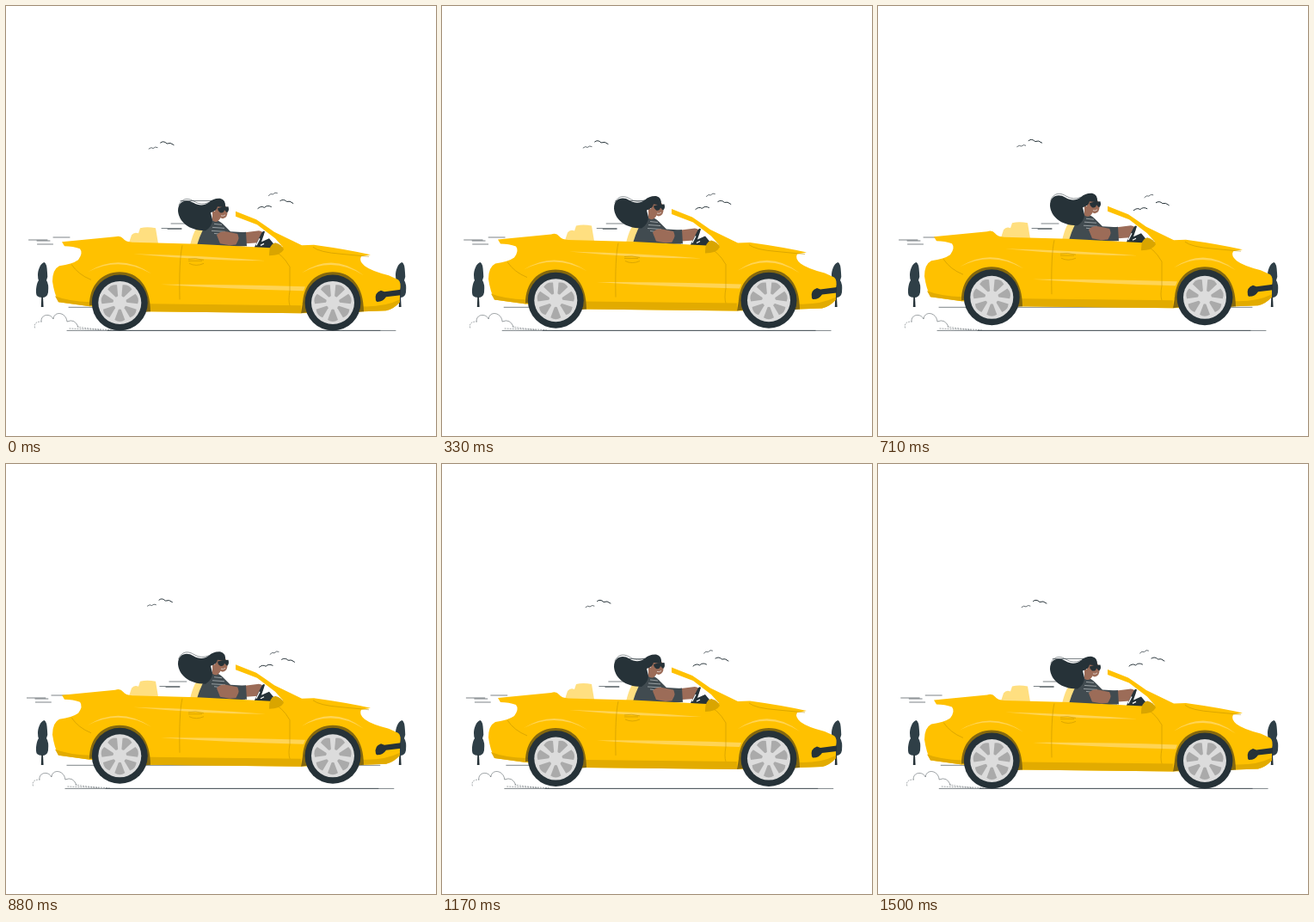
Recreate the animation shown at these times as an HTML page. Size 500 by 500 pixels, loop 1.54 s.

```html
<!DOCTYPE html>
<html lang="en">
<head>
<meta charset="utf-8">
<title>Convertible</title>
<style>
  html, body { margin: 0; width: 100%; height: 100%; overflow: hidden; background: #fff; }
  svg { display: block; width: 100%; height: 100%; }
  .line { fill: none; stroke: #263238; stroke-linecap: round; stroke-linejoin: round; }
  .seam { fill: none; stroke: #b98c00; stroke-width: .5; }
  .dark { fill: #263238; }
  .shade { fill: #e2ab00; }
  .light { fill: #ffd454; }
  .seat { fill: #ffdf80; }
  .skin { fill: #9c6c58; }
  .shirt { fill: #414b50; }
</style>
</head>
<body>
<svg viewBox="0 0 500 500">
  <defs>
    <g id="tree">
      <path fill="#2f3f47" d="M44.500 298C40 299 37 307 37 313Q37 317 38 319C35 323 34 334 36 337Q38 339 42 339Q48 339 49 333Q50 323 47 319Q49 315 48 310Q47.500 299 44.500 298Z"/>
      <path class="dark" d="M41.300 338H43L43.600 350H40.800Z"/>
    </g>
    <g id="wheel">
      <circle class="dark" r="32.500"/>
      <circle r="25" fill="#dcdcdc"/>
      <g id="vents" fill="#aaa"></g>
    </g>
    <path id="arch" fill="#86690e" d="M-35 3C-35-21-20-36 0-36C22-36 36-19 36 10L25 11L-25 3Z"/>
  </defs>

  <g class="line">
    <g id="birdsLeft">
      <path d="M180.500 159.500Q184 156.500 188 160.500Q192 158.500 196 162"/>
      <path stroke-width=".7" d="M167 166.500Q170 164 172 166Q174.500 163.500 177 165"/>
    </g>
    <g id="birdsRight">
      <path stroke-width=".7" d="M304.500 220Q307 217 309.500 218.500Q312 215.500 314.500 217"/>
      <path d="M318 226Q322 223.500 325.500 227Q329 225.500 333 229"/>
      <path d="M292 235Q296 231.500 299.500 234Q303 230.500 307.500 233"/>
    </g>
  </g>

  <use href="#tree"/>
  <use href="#tree" x="416"/>

  <g id="streaks" class="line" stroke-width=".6">
    <path d="M26.500 272H48M36 273H51M36.500 277H54.500M55 269H74M192 253H212M181 258.500H204M188 259.500H204M203 226.500H242M73 350.300H437"/>
    <path d="M71 377.400H453M118 377.400H435"/>
    <g stroke-width=".45">
      <path stroke-dasharray="1 2" d="M33.500 374Q32 367 41 367M83 373Q100 376 122 376.500M74 375L110 376.500"/>
      <path d="M41 367C40 358 52 357 55 364C56 354 70 356 71 367Q80 363 84 373"/>
    </g>
  </g>

  <g id="car">
    <path class="seat" d="M143 275L146 266Q149 262 154 264L156 258Q164 256 174 258L177 276ZM214 278Q219 258 224 256.500L232 257V278Z"/>

    <g id="driver">
      <path class="shirt" d="M222 278Q228 258 236 250Q245 246 252 253L261 262L278 263V279L240 281Z"/>
      <path d="M242 253L251 254M240 257L254 258M239 261L255 262M242 264L250 265" fill="none" stroke="#aeb4b6" stroke-width=".8"/>
      <path class="skin" d="M240 238L250 240L249 247Q245 253 240 249ZM244 231Q256 226 257.500 238Q258 246 252 247Q244 245 243 238Z"/>
      <path class="skin" d="M245 266Q249 261 256 262L271 265L270 277L260 278L249 276ZM278 263L294 261Q301 262 299 268L293 275L279 276Z"/>
      <path class="shirt" d="M269 264L279 262.500L280 279L267 278L271 270Z"/>
      <path class="dark" d="M255 234Q256 225 249 223.500Q241 223 236 228C230 232.500 224 232 218 228.500C210 223.500 200 226 200 238C201 250 212 261 232 261Q240 256 240 248L238 240Q245 238 246 233Z"/>
      <path class="line" stroke-width=".5" d="M201 231C205 222 213 223 219 227Q227 232 236 228"/>
      <path class="dark" d="M246 235L251 233.500L258.500 233Q260 238 257 240L254 237Q253 241 249 240Q246 238 246 235Z"/>
      <path d="M250 243.500Q253 244.500 255 242.500" fill="none" stroke="#fff" stroke-width=".6"/>
    </g>

    <path class="dark" d="M289 280L297 264Q299 260 301 262L297 274L306 270L311 276V282H289Z"/>
    <path d="M291 278L295 270M296 278L300 276" stroke="#fff" stroke-width="1.200"/>

    <path id="body" fill="#ffc100" d="M65 274L127 268Q133 266 136 270Q139 274 147 274.500L222 276.500L308 281L322 280L313 270L292 254L267 244.500V238.500L291 248Q300 254 312 262.500L344 278L358 277.500Q398 283 424 289L413 291Q410 296 417 302Q425 308 445 313L456 318Q460 321 458 331V344Q451 352 442 354L415 355L343 357L167 355L97 349L61 344Q56 334 54 320Q54 306 62 302Q77 300 84 295Q90 287 86 282Q78 279 68 279Z"/>
    <path class="shade" d="M57 337Q72 343 98 344V349L61 344ZM167 346L343 348V357L167 355ZM414 349Q440 350 458 341V344Q451 352 442 354L415 355Z"/>
    <use href="#arch" x="132" y="345"/>
    <use href="#arch" x="380" y="345"/>
    <path fill="#86690e" d="M345 345L350 340V356L343 357Z"/>

    <path class="light" d="M95 309Q132 286 169 311Q132 290 95 309ZM344 310Q380 285 416 313Q380 290 344 310ZM180 323.500Q260 323 348 326L346 331Q260 329 180 323.500ZM148 288Q230 290 302 296Q230 296 148 288Z"/>
    <path class="seam" d="M205 278Q201 295 202 341M307 282Q321 287 330 303V331Q328 342 330 348M76 300Q84 312 99 318M357 280Q364 286 390 288L422 291M212 294Q220 292 230 295M213 299Q221 303 230 299M212 296H228"/>
    <path fill="#d9a500" d="M306 288Q306 277 313 275Q321 277 323 283Q319 290 306 290Z"/>
    <path class="dark" d="M430 342Q428 333 436 330.500L440 332L459 329.500V336L442 338Q438 344 431 343.500Z"/>

    <use href="#wheel" x="132.300" y="344.600"/>
    <use href="#wheel" x="380" y="344.600"/>
  </g>
</svg>
<script>
const LOOP = 1540, TAU = 2 * Math.PI;
const el = id => document.getElementById(id);
const move = (id, x, y) => el(id).setAttribute('transform', `translate(${x} ${y})`);

el('vents').innerHTML = Array.from({ length: 7 }, (_, i) =>
  `<path transform="rotate(${i * 360 / 7})" d="M-1.500 8Q0 7 1.500 8L6 20Q0 24-6 20Z"/>`).join('');

// time, horizontal offset
const drift = [[0, 0], [170, -.2], [460, -1.4], [710, -2], [1040, -2.2], [1120, 2], [1170, 1.8], [1540, 0]];

function track(keys, t) {
  const i = keys.findIndex(k => k[0] > t);
  const [t0, v0] = keys[i - 1], [t1, v1] = keys[i];
  return v0 + (v1 - v0) * (t - t0) / (t1 - t0);
}

function draw(now) {
  const t = now % LOOP;
  move('car', 0, .4 - 3.1 * (1 + Math.cos(TAU * (t - 735) / LOOP)));
  move('streaks', track(drift, t), 0);
  const swing = t < 1010 ? (1 - Math.cos(TAU * (t + 70) / 540)) / 2 : 0;
  move('birdsLeft', -5.5 * swing, -3 * swing);
  move('birdsRight', 5.5 * swing, 2.7 * swing);
  requestAnimationFrame(draw);
}
draw(performance.now());
</script>
</body>
</html>
```
